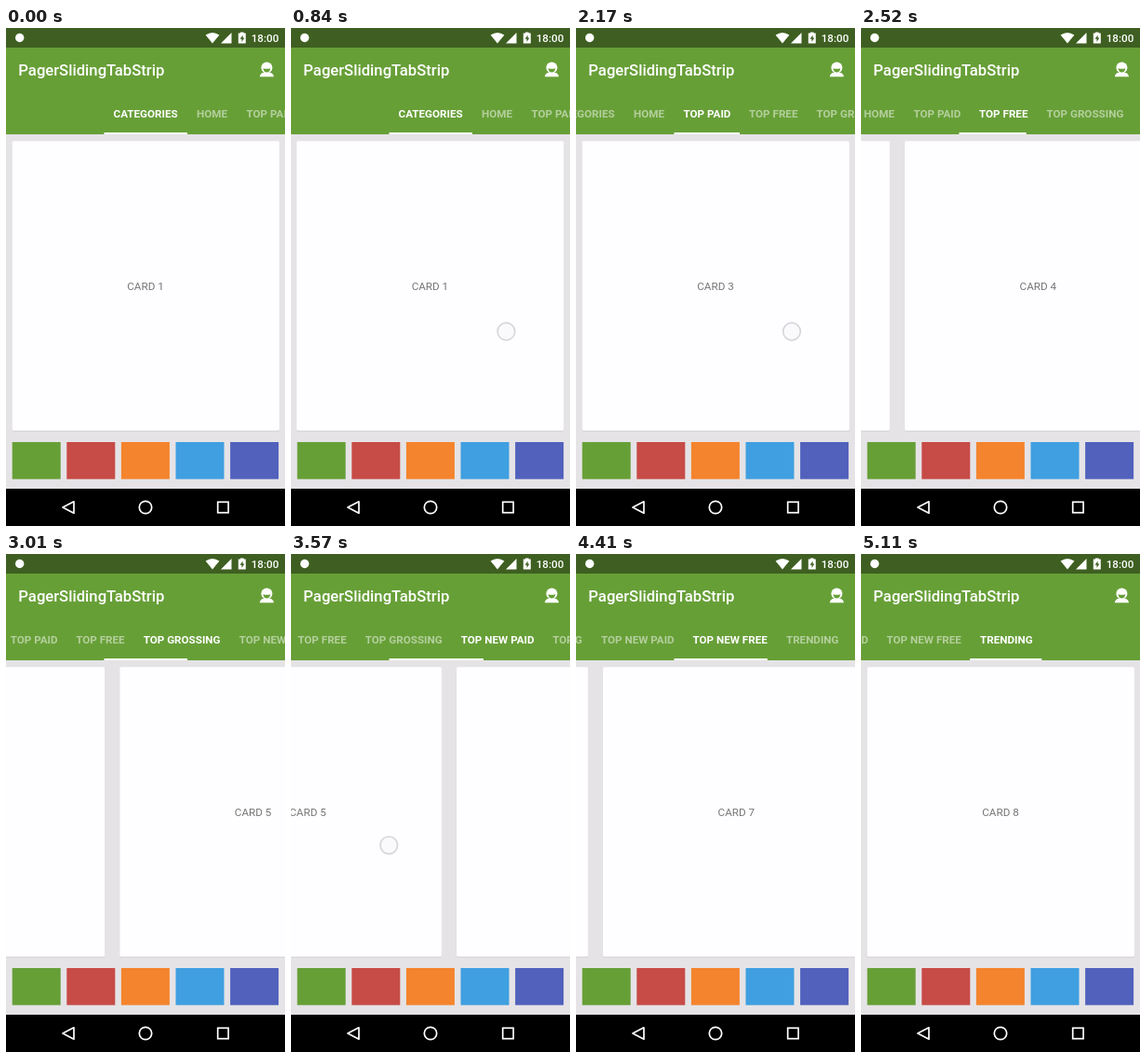
Animation, 300 px wide and 534 px high, one loop 5.25 s. Source, as an HTML page:

```html
<!DOCTYPE html>
<html lang="en">
<head>
<meta charset="utf-8">
<title>Sliding tabs</title>
<style>
  html, body { margin: 0; width: 100%; height: 100%; overflow: hidden; background: #e5e3e6; }
  svg { display: block; width: 300px; height: 534px; font-family: Roboto, sans-serif; font-size: 11.67px; }
  .title { font-size: 16.67px; font-weight: 500; }
  .tab { fill: #fff; font-weight: 700; opacity: .5; }
  .tab.on { opacity: 1; }
  .label { fill: #757575; text-anchor: middle; }
</style>
</head>
<body>
<svg viewBox="0 0 300 534">
  <rect width="300" height="534" fill="#e5e3e6"/>
  <g id="pages"></g>

  <rect width="300" height="114" fill="#679f37"/>
  <rect width="300" height="21" fill="#3e5f21"/>
  <g fill="#fff">
    <circle cx="14.7" cy="10.5" r="4.7"/>
    <path d="M214.6 7.6Q222 2.4 229.4 7.6L222 16.6Z"/>
    <path d="M242.5 5V16.4H231Z"/>
    <path d="M252 5.6V4.4H255.600V5.600H257.800V16.600H249.800V5.600Z"/>
    <path d="M254.600 7.400L251.600 11.800H253.500V15L256.400 10.400H254.600Z" fill="#3e5f21"/>
    <text x="263.700" y="15" font-weight="500">18:00</text>
    <text class="title" x="13.300" y="50.500">PagerSlidingTabStrip</text>
    <circle cx="280.400" cy="42.600" r="6"/>
    <path d="M272.800 52.200Q273.400 48.600 277 47.800H283.800Q287.400 48.600 288 52.200Z"/>
    <path d="M276.400 43.200Q280.400 44.400 284.400 43.200Q283.600 47.400 280.400 47.400Q277.200 47.400 276.400 43.200Z" fill="#679f37"/>
  </g>
  <g id="strip"></g>
  <rect id="bar" y="112" height="2" fill="#fff"/>

  <g id="swatches"></g>
  <rect y="494" width="300" height="40"/>
  <g fill="none" stroke="#fff" stroke-width="1.700">
    <path d="M73 507.800V520.200L61 514Z" stroke-linejoin="round"/>
    <circle cx="150" cy="514" r="6.700"/>
    <rect x="227.700" y="508.300" width="11.400" height="11.400"/>
  </g>
  <circle id="touch" r="9.300" fill="#fafafc" stroke="#d6d6dc" stroke-width="1.700"/>
</svg>
<script>
const LOOP = 5250, STEP = 70;
const PITCH = 303.3;      // page width plus margin
const INSET = 105.5;      // strip padding on both sides
const LAG = 17;           // the strip trails the pager by one screen refresh
const SELECT = 175, RELEASE = 200;
const swipes = [830, 1500, 2170, 2780, 3390, 4023, 4620];
const travel = [[0, 0], [100, 6], [180, 132], [250, 210], [350, 263], [387, 281], [430, 294], [490, PITCH]];
const tabs = [
  ['CATEGORIES', 89.5], ['HOME', 53.5], ['TOP PAID', 70.5], ['TOP FREE', 72.5],
  ['TOP GROSSING', 103], ['TOP NEW PAID', 98.5], ['TOP NEW FREE', 100.5], ['TRENDING', 77]
];
const colors = ['#679f37', '#c74b46', '#f4842d', '#3f9fe0', '#5161bc'];

const $ = id => document.getElementById(id);
const mix = (a, b, k) => a + (b - a) * k;

function add(parent, name, attrs, text = '') {
  const el = document.createElementNS('http://www.w3.org/2000/svg', name);
  for (const key in attrs) el.setAttribute(key, attrs[key]);
  el.textContent = text;
  return parent.appendChild(el);
}

const lefts = [];
let total = 0;
const labels = tabs.map(([name, width], i) => {
  const x = i * PITCH;
  add($('pages'), 'rect', { x: x + 6.6, y: 122.3, width: 287.4, height: 310.4, rx: 1.5, fill: '#d3d1d5' });
  add($('pages'), 'rect', { x: x + 6.7, y: 121.3, width: 287.2, height: 310.4, rx: 1.5, fill: '#fefdff' });
  add($('pages'), 'text', { class: 'label', x: x + 150, y: 281 }, 'CARD ' + (i + 1));
  lefts.push(total);
  total += width;
  return add($('strip'), 'text', { class: 'tab', x: lefts[i] + 10, y: 95.5 }, name);
});
colors.forEach((fill, i) =>
  add($('swatches'), 'rect', { x: 6.7 + i * 58.6, y: 444, width: 52, height: 39.7, fill }));

const maxScroll = total + 2 * INSET - 300.5;

// Distance a page has moved, ms after the finger went down
function slide(ms) {
  if (ms <= 0) return 0;
  const i = travel.findIndex(p => p[0] > ms);
  if (i < 0) return PITCH;
  const [t0, x0] = travel[i - 1], [t1, x1] = travel[i];
  return mix(x0, x1, (ms - t0) / (t1 - t0));
}

const pageAt = t => swipes.reduce((sum, s) => sum + slide(t - s), 0) / PITCH;

function draw(t) {
  $('pages').setAttribute('transform', `translate(${-pageAt(t) * PITCH})`);

  const page = pageAt(t - LAG);
  const i = Math.min(Math.floor(page), tabs.length - 1);
  const next = Math.min(i + 1, tabs.length - 1);
  const left = mix(lefts[i], lefts[next], page - i);
  const origin = INSET - Math.min(left, maxScroll);
  $('strip').setAttribute('transform', `translate(${origin})`);
  $('bar').setAttribute('x', origin + left);
  $('bar').setAttribute('width', mix(tabs[i][1], tabs[next][1], page - i));

  const selected = swipes.filter(s => t - s >= SELECT).length;
  labels.forEach((el, n) => el.classList.toggle('on', n === selected));

  const down = swipes.find(s => t >= s && t - s < RELEASE);
  $('touch').style.display = down === undefined ? 'none' : '';
  if (down !== undefined) {
    const x = slide(t - down);
    $('touch').setAttribute('cx', 232 - x * .96);
    $('touch').setAttribute('cy', 325.5 - x * .1);
  }
}

function tick() {
  const t = performance.now() % LOOP;
  draw(Math.floor(t / STEP) * STEP);
  requestAnimationFrame(tick);
}
tick();
</script>
</body>
</html>
```
